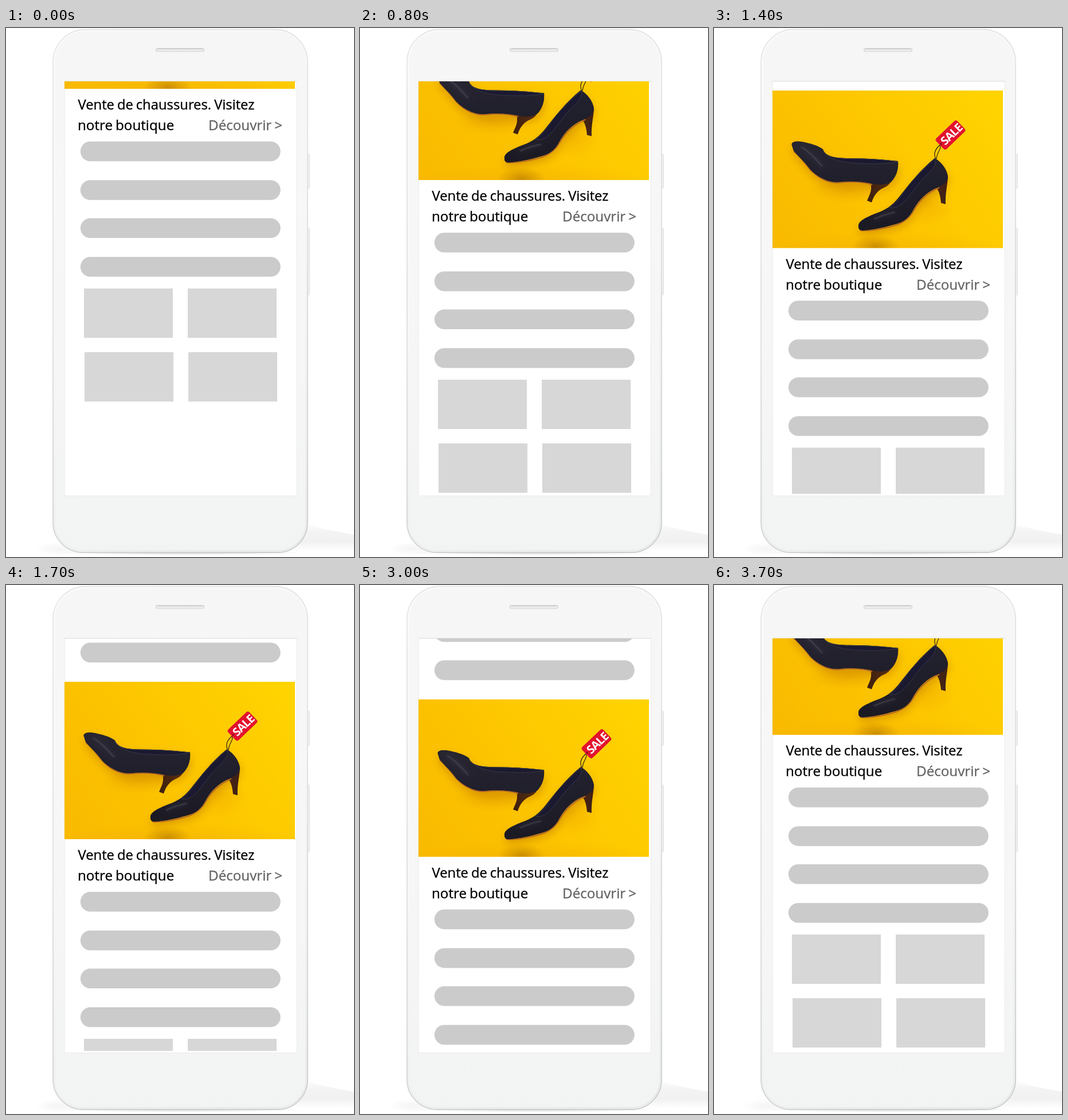
Write an HTML page with a canvas that moves like this. It is 607 by 922 pixels and loops after 4.7 s.

```html
<!DOCTYPE html>
<html lang="fr">
<head>
<meta charset="utf-8">
<title>Vente de chaussures</title>
<style>
html, body { margin: 0; width: 100%; height: 100%; overflow: hidden; background: #fff; }
canvas { display: block; }
</style>
</head>
<body>
<canvas id="stage" width="607" height="922"></canvas>
<script>
const ctx = document.getElementById('stage').getContext('2d');
const LOOP = 4700, STEP = 100;

// [time in ms, scroll distance in px]
const scrollKeys = [
  [0, 0], [400, 78.5], [800, 159], [1400, 277.5], [2000, 396.5],
  [2900, 396.5], [3200, 310.2], [3700, 155.2], [LOOP, 155.2]
];

function scrollAt(time) {
  const t = Math.floor((time % LOOP) / STEP) * STEP;
  const i = scrollKeys.findIndex(key => key[0] > t);
  const [t0, y0] = scrollKeys[i - 1], [t1, y1] = scrollKeys[i];
  return y0 + (y1 - y0) * (t - t0) / (t1 - t0);
}

function linear(x0, y0, x1, y1, ...colors) {
  const g = ctx.createLinearGradient(x0, y0, x1, y1);
  colors.forEach((c, i) => g.addColorStop(i / (colors.length - 1), c));
  return g;
}

function roundBox(x, y, w, h, r, fill, stroke, lineWidth = 1) {
  ctx.beginPath();
  ctx.roundRect(x, y, w, h, r);
  if (fill) { ctx.fillStyle = fill; ctx.fill(); }
  if (stroke) { ctx.strokeStyle = stroke; ctx.lineWidth = lineWidth; ctx.stroke(); }
}

function fillPath(d, fill) {
  ctx.fillStyle = fill;
  ctx.fill(new Path2D(d));
}

function strokePath(d, color, width) {
  ctx.strokeStyle = color;
  ctx.lineWidth = width;
  ctx.stroke(new Path2D(d));
}

function softSpot(x, y, rx, ry, rgb, alpha) {
  ctx.save();
  ctx.translate(x, y);
  ctx.scale(rx, ry);
  const g = ctx.createRadialGradient(0, 0, 0, 0, 0, 1);
  g.addColorStop(0, `rgba(${rgb},${alpha})`);
  g.addColorStop(0.5, `rgba(${rgb},${alpha * 0.5})`);
  g.addColorStop(1, `rgba(${rgb},0)`);
  ctx.fillStyle = g;
  ctx.fillRect(-1, -1, 2, 2);
  ctx.restore();
}

function label(text, x, y, size, color) {
  ctx.font = `${size}px "Open Sans", "Noto Sans", sans-serif`;
  ctx.wordSpacing = '-1.2px';
  ctx.fillStyle = ctx.strokeStyle = color;
  ctx.lineWidth = 0.35;
  ctx.fillText(text, x, y);
  ctx.strokeText(text, x, y);
}

function drawPhone() {
  ctx.fillStyle = '#fff';
  ctx.fillRect(0, 0, 607, 922);

  // floor shadow
  fillPath('M515 862 C540 870 575 878 607 883 V912 H500 Z',
    linear(0, 862, 0, 912, '#fff', '#f3f3f3', '#f1f1f1', '#fff'));
  softSpot(90, 908, 40, 12, '200,200,200', 0.2);
  softSpot(304, 914, 215, 5, '160,160,160', 0.5);

  // side buttons
  roundBox(524, 219.5, 5.5, 60, 2, '#f0f1f2', '#dcdedf');
  roundBox(524, 348.5, 5.5, 117, 2, '#f0f1f2', '#dcdedf');

  // body
  roundBox(82, 2.5, 444, 911.5, [57, 57, 52, 52],
    linear(0, 2, 0, 914, '#f6f6f6', '#f7f7f7', '#f6f6f7', '#f2f3f3'),
    linear(82, 0, 526, 914, '#e6e7e8', '#dcdedf', '#c9cbcc'), 1.8);
  roundBox(84.5, 5, 439, 906, [54, 54, 49, 49], null,
    linear(84, 0, 524, 914, '#fbfbfb', '#f6f6f6', '#e6e7e8'), 2);

  // earpiece
  roundBox(261.5, 35.5, 84, 5.5, 2.7, '#ececec', '#d2d3d4', 1.2);
  strokePath('M264 36.5 H343', '#c6c7c8', 1.2);

  // screen
  roundBox(102, 92.5, 405.5, 723, 1, '#fff', '#eeefef', 1.5);
  strokePath('M102 93 H508', '#e6e7e8', 1.5);
}

function drawShoe(outline, opening, heel, sole, shine) {
  ctx.save();
  ctx.shadowColor = 'rgba(170,95,0,.42)';
  ctx.shadowBlur = 16;
  ctx.shadowOffsetX = 1;
  ctx.shadowOffsetY = 8;
  fillPath(outline, '#1d1c2a');
  ctx.restore();
  fillPath(heel, linear(265, 0, 408, 0, '#3c1f10', '#6b3710', '#3c1f16'));
  strokePath(sole, '#b76b20', 2.2);
  fillPath(outline, linear(0, 318, 0, 470, '#262530', '#1f1e2b', '#1b1a23'));
  fillPath(opening, '#1a1930');
  strokePath(opening, '#3b3a46', 0.9);
  ctx.save();
  ctx.clip(new Path2D(outline));
  ctx.shadowColor = '#777684';
  ctx.shadowBlur = 8;
  strokePath(shine, 'rgba(105,104,118,.3)', 2.5);
  ctx.restore();
}

function drawTag() {
  strokePath('M387 347 C382 338 386 330 394 323 C398 329 389 334 388 347', '#2b2018', 1.2);
  ctx.save();
  ctx.translate(412.5, 305.5);
  ctx.rotate(-0.76);
  roundBox(-25.5, -13, 51, 26, 4, '#e2132d');
  ctx.fillStyle = '#5c1620';
  ctx.beginPath();
  ctx.arc(-22.5, 0, 1.4, 0, Math.PI * 2);
  ctx.fill();
  ctx.font = 'bold 20px "Open Sans", "Noto Sans", sans-serif';
  ctx.letterSpacing = '-1px';
  ctx.textAlign = 'center';
  ctx.fillStyle = '#fff';
  ctx.fillText('SALE', 2, 7.2);
  ctx.restore();
}

function drawPhoto() {
  ctx.save();
  ctx.beginPath();
  ctx.rect(102, 228, 402, 274.5);
  ctx.clip();
  ctx.fillStyle = linear(102, 480, 470, 228, '#f9ba00', '#fdc600', '#ffd300');
  ctx.fillRect(102, 228, 402, 275);
  softSpot(300, 515, 240, 40, '235,160,0', 0.4);
  softSpot(282, 500, 42, 20, '150,90,0', 0.45);
  softSpot(235, 400, 70, 24, '205,120,0', 0.3);
  softSpot(370, 425, 50, 40, '225,145,0', 0.3);

  drawShoe(
    'M135.5 322 C136 315.5 148 316 159 318.5 C172 321.5 183 325 190 330.5 C194 342 208 346 235 346 C268 346 300 349 321 351 C322 363 319 377 309 387 C303 391 293 393 283 391.5 C262 387 238 385 218 387.5 C199 389 181 379 168 366 C158 352 147 343 139 333 Z',
    'M190 332 C194 343 211 347 240 347 C276 347 302 349 320 352 C302 356 278 356 256 355 C229 354 200 350 190 332 Z',
    'M273 389 C277 402 270 412 267 420 L275 423 C279 411 285 402 297 397 Q306 393 309 386 Z',
    'M139 334 C152 344 160 357 169 367 C182 380 199 390 219 388.5 C239 386 260 387 276 392',
    'M152 326 C167 335 178 348 189 360');
  drawShoe(
    'M252 465 C251 455 266 449 283 442 C300 436 310 429 321 416 C339 393 360 366 385 346 C395 351 406 364 408 378 C408 387 399 393 390 397 C371 404 357 419 348 435 C341 449 332 457 316 461 C299 466 276 471 259 472 Q252 472 252 465 Z',
    'M306 432 C323 422 333 398 352 379 C365 366 377 354 386 347 C388 357 382 364 374 372 C354 390 341 416 325 428 Q315 434 306 432 Z',
    'M387 397 Q394 403 396 424 L404 426 C403 409 407 394 408 379 Z',
    'M255 472 C277 473 304 467 319 462 C334 456 342 448 349 436 C358 420 373 406 393 397',
    'M279 452 C294 445 302 443 316 440');
  drawTag();
  ctx.restore();
}

function drawContent(scroll) {
  const top = scroll - 168.5; // top edge of the photo
  ctx.save();
  ctx.beginPath();
  ctx.rect(102, 93, 402, 719);
  ctx.clip();
  ctx.translate(0, top - 228);
  drawPhoto();
  ctx.translate(0, 228);

  label('Vente de chaussures. Visitez', 125.5, 310.7, 23.8, '#000');
  label('notre boutique', 125, 346.7, 24.2, '#000');
  label('Découvrir >', 353, 346.7, 24.2, '#636363');

  for (const y of [-134.5, -68, 366.3, 433.7, 500.1, 567.5])
    roundBox(129.8, y, 349, 34.5, 17.25, '#cbcbcb');

  ctx.fillStyle = '#d7d7d7';
  for (const [x, y] of [[136, 622.5], [317, 622.5], [137, 733.5], [318, 733.5]])
    ctx.fillRect(x, y, 155, 86);
  ctx.restore();
}

function render() {
  drawPhone();
  drawContent(scrollAt(performance.now()));
  requestAnimationFrame(render);
}
render();
</script>
</body>
</html>
```
